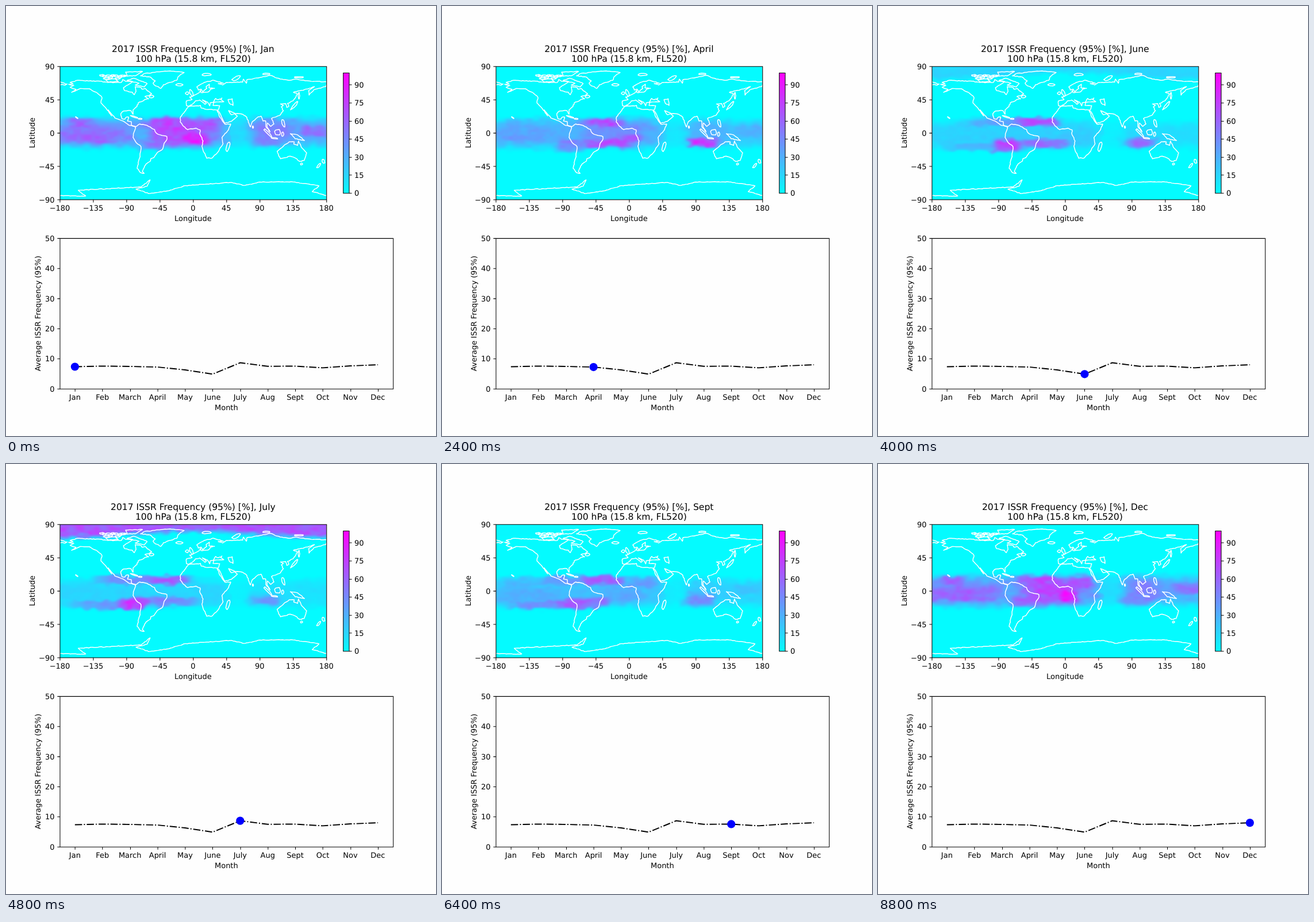
An HTML page with a canvas for the animation above (9600 ms loop, 748 by 748 pixels).

```html
<!DOCTYPE html>
<html lang="en">
<head>
<meta charset="utf-8">
<title>ISSR frequency by month</title>
<style>
  html, body { margin: 0; width: 100%; height: 100%; overflow: hidden; background: #fefefe; }
  canvas { position: absolute; left: 93.5px; top: 104.7px; width: 463.8px; height: 231.9px; }
  svg { position: absolute; left: 0; top: 0; width: 748px; height: 748px; }
  text { font: 13.89px "DejaVu Sans", sans-serif; text-rendering: geometricPrecision; }
  .title { font-size: 16.67px; }
  .mid { text-anchor: middle; }
  .end { text-anchor: end; }
  .frame { fill: none; stroke: #000; stroke-width: 1.11; }
</style>
</head>
<body>
<canvas width="240" height="120"></canvas>
<svg viewBox="0 0 800 800">
  <defs>
    <linearGradient id="cool" x1="0" y1="1" x2="0" y2="0">
      <stop stop-color="#04fbff"/><stop offset="1" stop-color="#f0f"/>
    </linearGradient>
    <clipPath id="map"><rect x="100" y="112" width="496" height="248"/></clipPath>
  </defs>
  <g clip-path="url(#map)">
    <path id="coast" transform="translate(348 236) scale(1.3778 -1.3778)"
      fill="none" stroke="#fff" stroke-width="1.15" stroke-linejoin="round"/>
  </g>
  <path fill="url(#cool)" class="frame" style="fill:url(#cool)" d="M627.5 124.5H638.5V348.5H627.5Z"/>
  <path class="frame" d="M100.5 112.5H596.5V360.5H100.5ZM100.5 432.5H720.5V712.5H100.5Z"/>
  <path class="frame" id="ticks"/>
  <g id="labels"></g>
  <text class="title mid" id="title" x="348" y="86"></text>
  <text class="title mid" x="348" y="104">100 hPa (15.8 km, FL520)</text>
  <text class="mid" x="348" y="400.3">Longitude</text>
  <text class="mid" x="410" y="752.3">Month</text>
  <text class="mid" transform="translate(53.5 236) rotate(-90)">Latitude</text>
  <text class="mid" transform="translate(64 572) rotate(-90)">Average ISSR Frequency (95%)</text>
  <path id="line" fill="none" stroke="#000" stroke-width="2.08" stroke-dasharray="13.33 3.33 2.08 3.33"/>
  <circle id="dot" r="7.6" fill="#00f"/>
</svg>
<script>
const $ = id => document.getElementById(id);
const names = 'Jan Feb March April May June July Aug Sept Oct Nov Dec'.split(' ');
const means = [7.35, 7.57, 7.45, 7.25, 6.3, 4.9, 8.67, 7.5, 7.55, 7, 7.63, 8];
const monthX = m => 128.2 + m * 51.24;
const meanY = v => 712.3 - v * 5.6;

let seed = 7;
const rand = () => (seed = seed * 16807 % 2147483647) / 2147483647;

// Key points of the coasts as "lon,lat"; the ragged detail in between is random
const coasts = [
  '-141,70 -156,71 -166,68 -162,66 -168,65.5 -161,64 -166,61.5 -158,58.7 -164,54.7 -152,60 -140,59.5 -130,54.3 -123,48 -124.3,40.3 -117,32.5 -110,23 -114.5,31 -105.5,20 -94.5,16 -85.7,10 -79,8.7 -77.5,7 -80.5,-1 -81,-6 -76,-14 -70.3,-18.5 -71.5,-32 -73.5,-38 -75.5,-48 -71,-53.8 -66,-54.8 -68.5,-52 -66,-47 -63.5,-42 -57.5,-38 -57,-35 -53,-33.5 -48.6,-27 -41.5,-22.5 -39,-14 -35,-8',
  '-35,-8 -35.3,-5 -44.5,-2.7 -50,0 -52,4.5 -62,10 -72,12 -77,8.5 -83.5,10.5 -83.4,15 -88.5,16 -87,21.3 -90.5,21 -92,18.5 -96,19 -97.6,26 -94,29.5 -84,30 -81,25.2 -81,31 -75.7,35.5 -74,40.6 -70,42 -65,45 -60,46 -65,49 -60,50.2 -56,53 -62,57 -65,60 -69,59 -70,61 -78,62.4 -77,56 -79.5,51.5 -82.3,55 -92.5,57 -94,61 -86,66 -81.5,69 -91,69.5 -95,72 -97,68 -115,68 -128,70 -141,70',
  '-47,82.5 -31,83.6 -12,81.5 -20,76 -22,71 -32,68 -40,65 -43.4,60 -51,63.6 -54,67 -51,70 -58,75.5 -71,77 -66,80 -47,82.5',
  '-68,83 -78,77 -89,76.5 -91,82 -68,83',
  '-80,73.8 -67,69 -62,66.5 -66,62 -78,64.6 -73,67 -89,71 -80,73.8',
  '-105,73 -118,71.5 -114,68.5 -101,69.5 -105,73',
  '-180,69 -170,66 -173,64.3 -177,65.5 -180,65',
  '180,69 160,69.5 140,72.5 129,71 113,74 104,77.7 81,73 73,72 72,67 68,72.5 67,68.5 45,68 40,64.7 34,66.5 41,67 28,71 15,68 5,62 7,58 11,59 13,55.5 18.5,60 17.5,62 22,65.7 21.5,61 29,60 23.5,59 21,55.5 10.5,54.5 10,57.5 8,54 -1.5,49 -4.6,48.5 -1.3,45 -9,43 -9,37 -5.5,36',
  '-5.5,36 0,39.5 3,43 9,44.3 16,38.5 18,40 12.5,44.5 19.5,41.5 22.5,36.5 23,40.5 27,41 30.5,46.5 34,44.6 39,47 37.5,45 41.5,42 28,41 27,37 36,36.6 34,31 20,31.5 11,33.5 10,37 -6,35.6 -10,30 -17,21.5 -17.3,14.7 -13,9 -7.5,4.4 4,6.3 9.5,4 9,-1 13.5,-11 12,-18 15.2,-27 18.4,-34.2 25.7,-34 32.7,-27 35.4,-23 40.5,-14.5 39,-6.5 48,4.4 51,12',
  '51,12 43.3,11.5 37.2,20 32.5,30 35,28.5 43,13 52,15.6 59.8,22.4 56,26 51.5,24.5 48,30 57,26 66.5,25.2 72.6,21 77.5,8 80,15 88,21.7 92,22.5 94.5,16 98,16 98.5,8 104,1.3 100,8 100.5,13.4 105,8.7 109.2,12 106,19.5 110,21 117,23.5 121.9,30 119.2,35 122,37 118,39 125,39.6 126.5,34.5 129.4,36 127.5,39.8 135,43.3 141,52.5 135.5,54.7 155,59.3 164,62.5 156,57 156.7,51 163,58 179,62.4 180,65',
  '47,45 53,46 54,37 49,40 47,45',
  '131,-1 141,-2.7 150.5,-10.3 138,-8 131,-1',
  '142.5,-10.8 146,-19 153.4,-27 150,-37.3 144,-38.5 138,-34 131,-31.5 118,-35 113.6,-25 122,-18 130,-12 136.8,-12.2 136,-15 141,-17 142.5,-10.8',
  '-180,-84.6 -145,-85.3 -155,-77.5 -110,-75 -70,-73 -58,-63.5 -62,-72 -77,-76 -60,-82 -35,-78.5 -10,-71.2 50,-67 70,-71 90,-66.5 135,-66.2 170,-71.5 161,-79.5 180,-84.6'];

// Islands: longitude, latitude, half width, half height, tilt in degrees
const islands = [
  [-2.5, 54, 1.8, 4.5, 20], [-8, 53.4, 2, 1.8, 0], [-18.5, 65, 5, 1.5, 0], [58, 73.5, 6, 2, 30],
  [18, 78.7, 6, 1.5, 0], [99, 79.5, 5, 1, 0], [143, 75, 6, .8, 0], [143, 50, 1, 4.2, 0],
  [137, 37, 7, 1.4, 48], [122, 13, 1.8, 5.5, 15], [114, 1, 4.2, 4, 20], [101, 0, 7.5, 1.4, -45],
  [110, -7.3, 4.5, .7, -5], [121, -2, 1.6, 3, 0], [47, -19, 2, 6.5, -15], [176, -38.5, 1.5, 3, 15],
  [170, -44, 1.3, 4, -40], [146.5, -42, 1.5, 1.3, 0], [-79.5, 21.7, 5, .8, -18],
  [-71.3, 19, 2.7, .8, 0], [-56, 49, 2.7, 2, 0], [80.8, 7.8, .8, 1.5, 0], [-157, 20.5, 2, .4, -35]];

function ragged(points) {
  let d = 'M' + points[0];
  for (let i = 1; i < points.length; i++) {
    const [x0, y0] = points[i - 1], [x1, y1] = points[i];
    const n = Math.ceil(Math.hypot(x1 - x0, y1 - y0) / 2.5);
    for (let k = 1; k <= n; k++) {
      const r = k < n ? .9 : 0;
      d += `L${x0 + (x1 - x0) * k / n + r * (rand() - .5)} ${y0 + (y1 - y0) * k / n + r * (rand() - .5)}`;
    }
  }
  return d;
}
function ring(lon, lat, w, h, tilt) {
  const c = Math.cos(tilt * Math.PI / 180), s = Math.sin(tilt * Math.PI / 180);
  const points = Array.from({ length: 10 }, (_, i) => {
    const a = i * Math.PI / 5, r = .8 + .4 * rand();
    const x = w * r * Math.cos(a), y = h * r * Math.sin(a);
    return [lon + x * c - y * s, lat + x * s + y * c];
  });
  return 'M' + points.join('L') + 'Z';
}
let shore = coasts.map(c => ragged(c.split(' ').map(p => p.split(',').map(Number)))).join('');
shore += islands.map(i => ring(...i)).join('');
for (let i = 0; i < 11; i++) shore += ring(-123 + i * 3, 73 + 5 * rand(), 2.5 + 2 * rand(), 1, 0);
$('coast').setAttribute('d', shore);

// Seasonal patches: longitude, latitude, half width, half height, peak value, peak month
const patches = [
  [-140, -4, 45, 9, 60, 11.5], [-152, 13, 17, 7, 62, 11.5], [-68, 0, 14, 9, 28, 0],
  [-20, 1, 38, 17, 72, 0], [3, -7, 16, 7, 90, .3], [20, 12, 18, 8, 68, 11],
  [-85, 15, 45, 6, 46, 6.5], [-115, -19, 45, 6, 46, 7.5], [-28, -14, 35, 6, 70, 3.5],
  [-52, -16, 22, 7, 68, 9.5], [-80, -17, 18, 8, 82, 5.8], [108, 2, 28, 16, 50, 0],
  [100, -13, 20, 6, 80, 3], [95, -12, 20, 9, 50, 9], [165, 3, 22, 7, 56, 11.7]];
const season = (m, peak) => .5 + .5 * Math.cos((m - peak) * Math.PI / 6);
const bump = (x, y, w, h) => Math.exp(-((x / w) ** 4) - (y / h) ** 4);

function hash(x, y) {
  const n = Math.sin(x * 127.1 + y * 311.7) * 43758.5453;
  return n - Math.floor(n);
}
function noise(x, y) {
  const i = Math.floor(x), j = Math.floor(y);
  const ease = t => t * t * (3 - 2 * t), mix = (a, b, t) => a + (b - a) * t;
  const u = ease(x - i), v = ease(y - j);
  return mix(mix(hash(i, j), hash(i + 1, j), u), mix(hash(i, j + 1), hash(i + 1, j + 1), u), v) - .5;
}
function level(m, lon, lat) {
  const winter = season(m, 0);
  const east = lon > 50 ? .7 : 1;
  // belt along the equator, thin over the western Indian Ocean
  let v = (16 + 28 * winter) * east * bump(0, lat + 3 - 4 * winter, 1, 19);
  v *= 1 - .55 * bump(lon - 62, 0, 20, 1);
  for (const [x, y, w, h, top, peak] of patches)
    v += (top - v) * season(m, peak) ** 1.5 * bump(lon - x, lat - y, w, h);
  v += (73 - v) * bump(lon + 35, lat - 15, 28, 6) * .9;
  // summer cap over the Arctic
  const edge = 75 + 4 * Math.cos(lon * Math.PI / 180);
  const cap = Math.min(1, Math.max(0, (lat - edge + 3) / 9));
  return v + 68 * cap * Math.exp(-((m - 6.2) ** 2));
}

const ctx = document.querySelector('canvas').getContext('2d');
function drawField(m) {
  const img = ctx.createImageData(240, 120), s = m * 40;
  for (let j = 0, p = 0; j < 120; j++) for (let i = 0; i < 240; i++, p += 4) {
    const lon = i * 1.5 - 179.25, lat = 89.25 - j * 1.5;
    const x = lon + 9 * noise(lon / 10 + s, lat / 7);
    const y = lat + 5 * noise(lon / 9 + s, lat / 6 + 50);
    const grain = 1 + .24 * noise(lon / 11 + s, lat / 6 + 90) + .15 * noise(lon / 5 + s, lat / 3);
    const c = 255 * Math.min(1, Math.max(.016, level(m, x, y) * grain / 100));
    img.data.set([c, 255 - c, 255, 255], p);
  }
  ctx.putImageData(img, 0, 0);
}

let ticks = '', labels = '';
const snap = v => Math.floor(v + .5) + .5;
const label = (x, y, s, cls) =>
  labels += `<text class="${cls}" x="${x}" y="${y}">${String(s).replace('-', '\u2212')}</text>`;
function xTick(x, y, s) {
  ticks += `M${snap(x)} ${y + .5}v4.9`;
  label(x, y + 21, s, 'mid');
}
function yTick(y, s) {
  ticks += `M100.5 ${snap(y)}h-4.9`;
  label(90.3, y + 5.4, s, 'end');
}
for (let d = -180; d <= 180; d += 45) xTick(348 + d * 1.3778, 360, d);
for (let d = -90; d <= 90; d += 45) yTick(236 - d * 1.3778, d);
for (let v = 0; v <= 50; v += 10) yTick(712 - v * 5.6, v);
names.forEach((s, m) => xTick(monthX(m), 712, s));
for (let v = 0; v <= 90; v += 15) {
  const y = 348 - v * 2.24;
  ticks += `M638.5 ${snap(y)}h4.9`;
  label(648, y + 5.4, v, '');
}
$('ticks').setAttribute('d', ticks);
$('labels').innerHTML = labels;
$('line').setAttribute('d', 'M' + means.map((v, m) => monthX(m) + ' ' + meanY(v)).join('L'));

let shown = -1;
function show(t) {
  const m = Math.floor(t / 800) % 12;
  if (m === shown) return;
  shown = m;
  drawField(m);
  $('title').textContent = `2017 ISSR Frequency (95%) [%], ${names[m]}`;
  $('dot').setAttribute('cx', monthX(m));
  $('dot').setAttribute('cy', meanY(means[m]));
}
const start = performance.now();
function tick() {
  show(performance.now() - start);
  requestAnimationFrame(tick);
}
tick();
</script>
</body>
</html>
```
